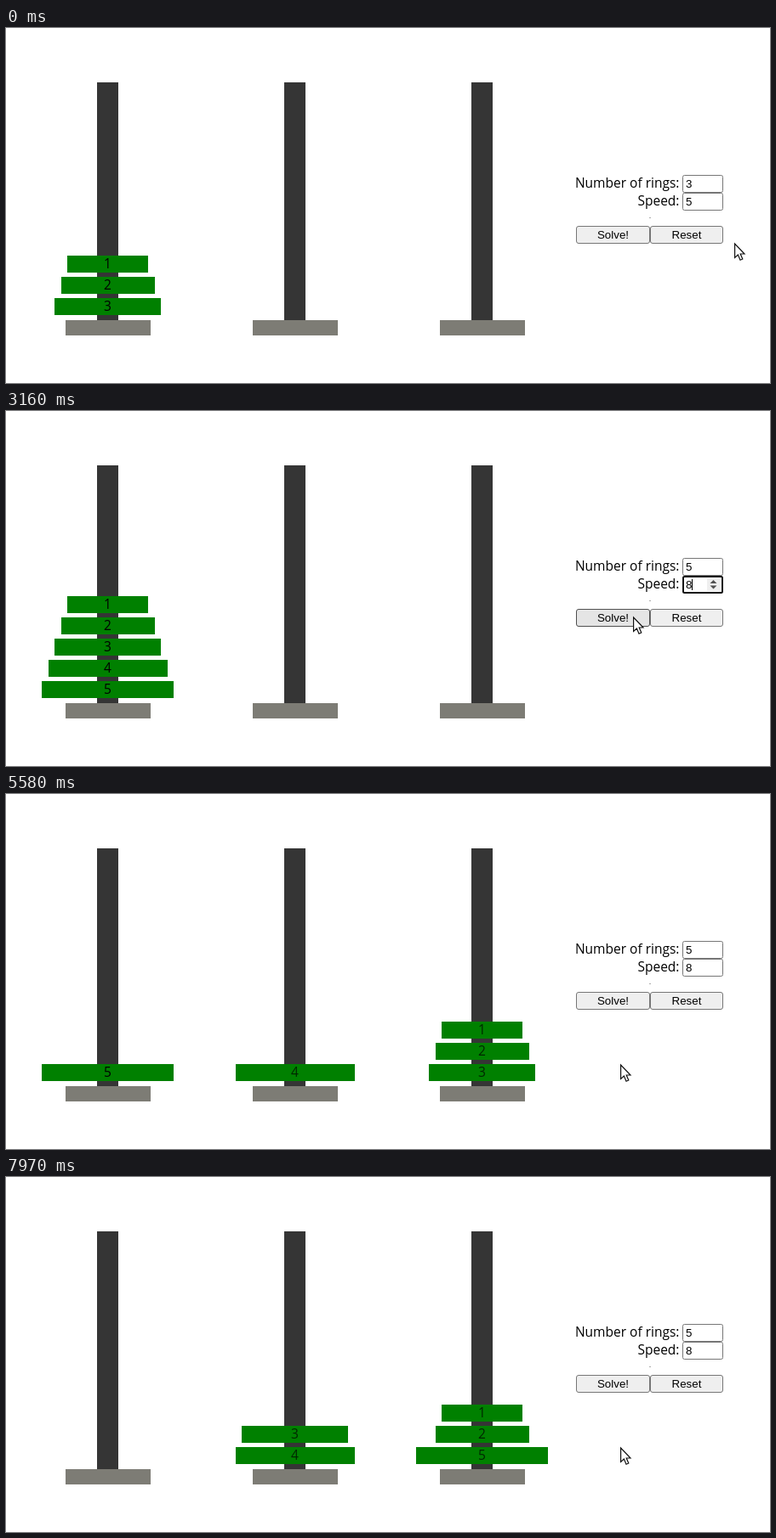
An HTML page for the animation above (8 s loop, 898 by 418 pixels).

```html
<!DOCTYPE html>
<html lang="en">
<head>
<meta charset="utf-8">
<title>Tower of Hanoi</title>
<style>
html, body { margin: 0; width: 100%; height: 100%; overflow: hidden; background: #fff; }
svg { display: block; }
text { font: 15.5px "Open Sans", "Noto Sans", sans-serif; }
.ui { font: 13.333px "Liberation Sans", Arial, sans-serif; }
</style>
</head>
<body>
<svg id="stage" width="898" height="418" viewBox="0 0 898 418"></svg>
<script>
const stage = document.getElementById("stage");
const LOOP = 8000, TICK = 77.2;
const CENTERS = [119.5, 339.5, 559.5];

// Pointer path: time, x, y
const PATH = [
  [0, 856, 253], [640, 834, 177], [1390, 834, 177], [1460, 833, 167],
  [1850, 833, 167], [2140, 831, 197], [2740, 831, 197], [3150, 737, 242],
  [3800, 737, 242], [4040, 722, 318]
];

const moves = [];
function solve(n, from, to, via) {
  if (!n) return;
  solve(n - 1, from, via, to);
  moves.push([from, to]);
  solve(n - 1, via, to, from);
}
solve(5, 0, 2, 1);

const moveTime = k => 3740 + 230 * k - (k > 10 ? 60 : 0) - (k > 18 ? 80 : 0);
const between = (t, a, b) => t >= a && t < b;
const count = (t, start, times) => start + times.filter(x => t >= x).length;

function pointer(t) {
  const q = Math.max(0, 70 + Math.floor((t - 70) / TICK) * TICK);
  const i = PATH.findIndex(p => p[0] > q);
  if (i < 0) return PATH[PATH.length - 1].slice(1);
  const [t0, x0, y0] = PATH[i - 1], [t1, x1, y1] = PATH[i];
  const u = (q - t0) / (t1 - t0), e = u * u * (3 - 2 * u);
  return [Math.round(x0 + (x1 - x0) * e), Math.round(y0 + (y1 - y0) * e)];
}

const rect = (x, y, w, h, fill, more = "") =>
  `<rect x="${x}" y="${y}" width="${w}" height="${h}" fill="${fill}" ${more}/>`;
const text = (x, y, s, anchor, more = "") =>
  `<text x="${x}" y="${y}" text-anchor="${anchor}" ${more}>${s}</text>`;

function towers(t) {
  const pegs = [[], [], []];
  for (let n = count(t, 3, [930, 1310]); n > 0; n--) pegs[0].push(n);
  moves.forEach(([from, to], i) => {
    if (t >= moveTime(i + 1)) pegs[to].push(pegs[from].pop());
  });
  return CENTERS.map((cx, p) =>
    rect(cx - 12.5, 64, 25, 280, "#353535") +
    rect(cx - 49.5, 344, 100, 18, "#7d7c75") +
    pegs[p].map((n, level) => {
      const w = 80 + 15 * n, y = 318 - 25 * level;
      return rect(Math.round(cx - w / 2), y, w, 20, "green") +
        text(cx, y + 15, n, "middle", p ? 'opacity=".7"' : "");
    }).join("")
  ).join("");
}

function field(y, value, focus, hover, pressed) {
  let s = focus
    ? rect(796, y + 1, 46, 19, "#fff", 'rx="1.5" stroke="#101010" stroke-width="2"')
    : rect(795.5, y + .5, 47, 20, "#fff", 'rx="2" stroke="#767676"');
  s += text(799, y + 15, value, "start", 'class="ui"');
  if (focus) s += rect(806, y + 4, 1, 13, "#000");
  if (focus || hover) {
    s += rect(824, y + 3, 15, 15, "#efefef");
    if (pressed) s += rect(824, y + 3, 15, 7, "#6b6b6b");
    s += `<path d="M827.5 ${y + 9}h8l-4-4z" fill="${pressed ? "#fff" : "#505050"}"/>` +
      `<path d="M827.5 ${y + 11.5}h8l-4 4z" fill="#505050"/>`;
  }
  return s;
}

function button(x, w, label, hover, pressed) {
  const [fill, line] = pressed ? ["#f5f5f5", "#8d8d8d"]
    : hover ? ["#e5e5e5", "#4f4f4f"] : ["#efefef", "#767676"];
  return rect(x + .5, 233.5, w - 1, 20, fill, `rx="2.5" stroke="${line}"`) +
    text(x + w / 2, 248, label, "middle", 'class="ui"');
}

function panel(t, [x, y]) {
  const over = (l, top, w) => between(x, l, l + w) && between(y, top, top + 21);
  return text(791.5, 188, "Number of rings:", "end") +
    text(791.5, 209, "Speed:", "end") +
    field(173, count(t, 3, [850, 1235]), between(t, 850, 2155), over(795, 173, 48),
      between(t, 850, 1000) || between(t, 1160, 1310)) +
    field(194, count(t, 5, [2155, 2240, 2390]), between(t, 2155, 3560), over(795, 194, 48),
      between(t, 2155, 2390)) +
    rect(756, 223, 2, 1, "#aaa") +
    button(670, 87, "Solve!", over(670, 233, 87), between(t, 3560, 3715)) +
    button(757, 86, "Reset", over(757, 233, 86), false);
}

const arrow = ([x, y]) =>
  `<path transform="translate(${x} ${y})" fill="#fff" stroke="#111" stroke-width="1.2"
    d="M.6 1V17.4L4.4 14 7 20.2 9.8 19 7.2 13H12z"/>`;

let last = "";
function draw(now) {
  const t = now % LOOP, p = pointer(t);
  const scene = towers(t) + panel(t, p) + arrow(p);
  if (scene !== last) stage.innerHTML = last = scene;
}

const start = performance.now();
function frame() {
  draw(performance.now() - start);
  requestAnimationFrame(frame);
}
frame();
</script>
</body>
</html>
```
